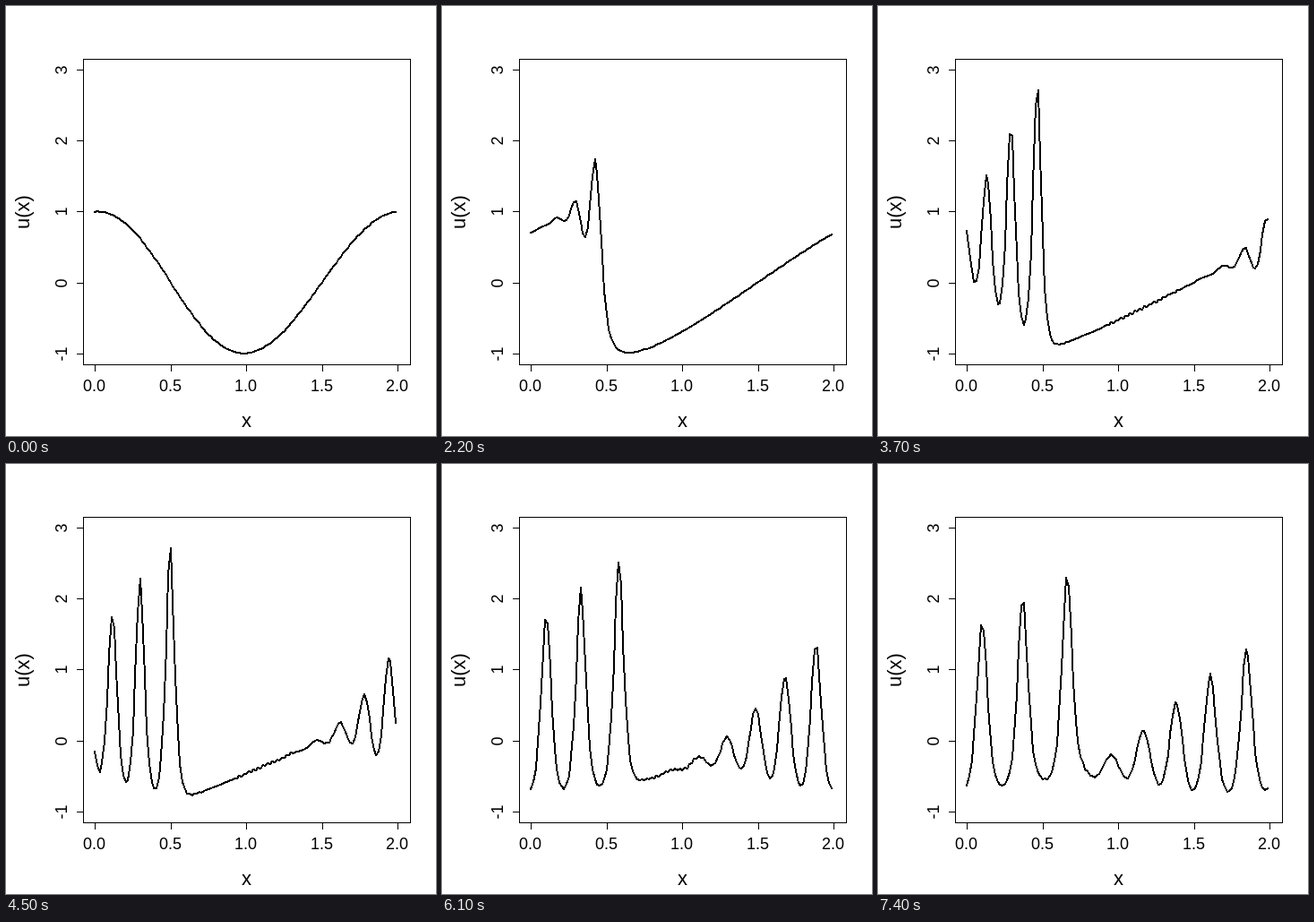
An HTML page for the animation above (7.5 s loop, 480 by 480 pixels).

```html
<!DOCTYPE html>
<html lang="en">
<head>
<meta charset="utf-8">
<title>Wave plot</title>
<style>
  html, body { margin: 0; width: 100%; height: 100%; overflow: hidden; background: #fff; }
  svg { display: block; width: 480px; height: 480px; }
  text { font-family: Arial, "Liberation Sans", sans-serif; text-anchor: middle; fill: #000; }
  .tick { font-size: 18px; }
  .label { font-size: 22px; }
  .line { fill: none; stroke: #000; stroke-width: 1; shape-rendering: crispEdges; }
  .curve { fill: none; stroke: #000; stroke-width: 2; stroke-linejoin: round;
           stroke-linecap: round; shape-rendering: crispEdges; }
</style>
</head>
<body>
<svg viewBox="0 0 480 480">
  <rect class="line" x="86.5" y="59.5" width="365" height="341"/>
  <g id="axes"></g>
  <text class="label" x="268.5" y="470">x</text>
  <text class="label" transform="translate(26 230) rotate(-90)">u(x)</text>
  <polyline class="curve" id="curve"/>
</svg>
<script>
const FRAMES = 75, FRAME_MS = 100;
const N = 128, H = 2 / N, DELTA = 0.022;
const STEP = 0.0005, STEPS_PER_FRAME = 32;

const px = x => Math.floor(99.91 + x * 168.89);
const py = u => Math.floor(309.03 - u * 79.11);

const axes = document.getElementById('axes');
const curve = document.getElementById('curve');

function add(name, attrs, content = '') {
  const el = document.createElementNS('http://www.w3.org/2000/svg', name);
  for (const key in attrs) el.setAttribute(key, attrs[key]);
  el.textContent = content;
  axes.append(el);
}

for (const x of [0, 0.5, 1, 1.5, 2]) {
  add('path', { class: 'line', d: `M${px(x) + 0.5} 401v7` });
  add('text', { class: 'tick', x: px(x) - 0.5, y: 430 }, x.toFixed(1));
}
for (const u of [-1, 0, 1, 2, 3]) {
  add('path', { class: 'line', d: `M79 ${py(u) + 0.5}h7` });
  add('text', { class: 'tick', transform: `translate(67.5 ${py(u) + 0.5}) rotate(-90)` }, u);
}

// Time derivative of u for u_t + u u_x + delta^2 u_xxx = 0, periodic in x
function slope(u) {
  return u.map((mid, j) => {
    const at = k => u[(j + k + N) % N];
    const r = at(1), l = at(-1);
    return -(r + mid + l) * (r - l) / (6 * H)
      - DELTA ** 2 * (at(2) - 2 * r + 2 * l - at(-2)) / (2 * H ** 3);
  });
}

const advance = (u, rate, dt) => u.map((v, j) => v + dt * rate[j]);
const toPoints = u => Array.from(u, (v, j) => px(j * H) + ',' + py(v)).join(' ');

// Leapfrog in time, one snapshot per frame
function solve() {
  let prev = Float64Array.from({ length: N }, (_, j) => Math.cos(Math.PI * j * H));
  const half = advance(prev, slope(prev), STEP / 2);
  let now = advance(prev, slope(half), STEP);
  const shots = [];
  for (let n = 1; shots.length < FRAMES; n++) {
    if (n % STEPS_PER_FRAME === 0) shots.push(toPoints(now));
    [prev, now] = [now, advance(prev, slope(now), 2 * STEP)];
  }
  return shots;
}

const shots = solve();
let shown = -1;

function draw() {
  const i = Math.floor(performance.now() / FRAME_MS) % FRAMES;
  if (i !== shown) curve.setAttribute('points', shots[shown = i]);
  requestAnimationFrame(draw);
}
draw();
</script>
</body>
</html>
```
